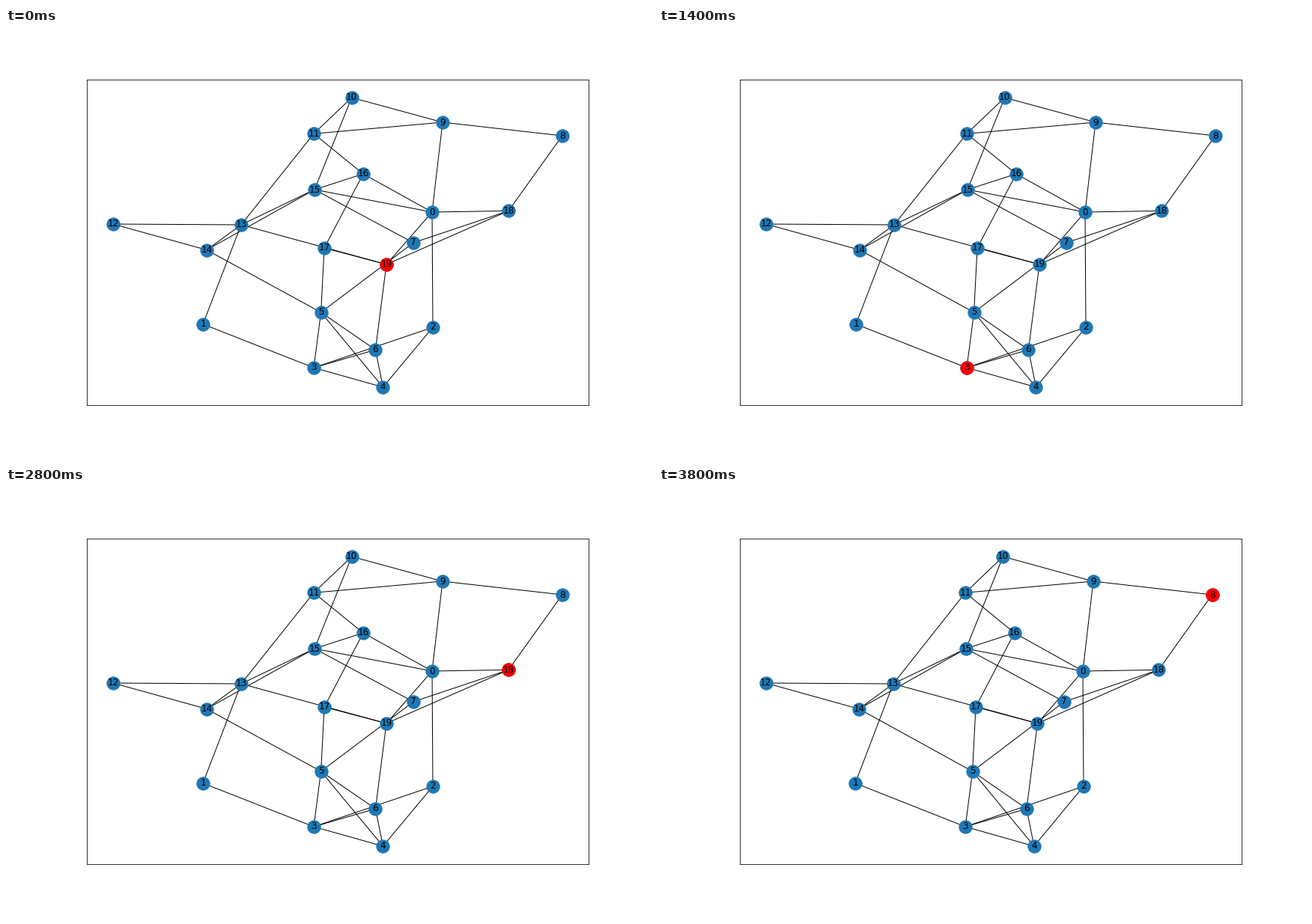
These frames come from a looping animation (864x576 px, 4000 ms). A matplotlib script:

```python
import numpy as np
import matplotlib.pyplot as plt
from matplotlib.animation import FuncAnimation
from matplotlib.collections import LineCollection

W, H, DPI = 864, 576, 72
N = 20
SIZE = 300                    # marker area in square points
RADIUS = np.sqrt(SIZE) / 2
MARGIN = 0.05

# Node positions in stage pixels, y pointing down
POS = np.array([
    (569, 246), (263, 395.8), (570, 400), (411, 454), (503.4, 480),
    (420.6, 380), (493.4, 430), (544, 287), (742.8, 144), (583, 126),
    (461.7, 93), (411, 141.3), (142.8, 262), (314, 263), (268, 296.6),
    (412, 216), (477, 195), (425, 294), (671, 244.4), (508, 315.9),
])

# Small-world graph: a ring with links of step 1 and 2, some of them rewired
REWIRED = {
    1: {0: 9, 1: 13, 6: 3, 7: 15, 11: 16, 17: 5},
    2: {6: 19, 7: 18, 8: 18, 10: 15, 14: 5, 15: 0, 16: 0, 19: 13},
}
EDGES = np.array([(i, REWIRED[step].get(i, (i + step) % N))
                  for step in (1, 2) for i in range(N)])

WALK = [19, 0, 2, 3, 5, 4, 5, 3] + [4, 2] * 2 + [0, 19] + [18, 8] * 3

# Axes rectangle, and the part of it left inside the margins
LO, HI = np.array([0.125 * W, 0.12 * H]), np.array([0.9 * W, 0.875 * H])
INSET = (HI - LO) * MARGIN / (1 + 2 * MARGIN)


def view(center):
    """Limits that hold the graph and the whole marker at center."""
    lo = np.minimum(LO + INSET, center - RADIUS)
    hi = np.maximum(HI - INSET, center + RADIUS)
    pad = (hi - lo) * MARGIN
    return lo - pad, hi + pad


fig = plt.figure(figsize=(W / DPI, H / DPI), dpi=DPI, facecolor="white")
ax = fig.add_axes([0.125, 0.125, 0.775, 0.755], xticks=[], yticks=[])
ax.add_collection(LineCollection(POS[EDGES], colors="black",
                                 linewidths=1, zorder=1))
ax.scatter(*POS.T, s=SIZE, c="#1f77b4", zorder=2)
walker = ax.scatter(*POS[WALK[0]], s=SIZE, c="red", zorder=2)
for i, (x, y) in enumerate(POS):
    ax.text(x, y, str(i), size=12, family="DejaVu Sans",
            ha="center", va="center", zorder=3)


def update(step):
    center = POS[WALK[step]]
    walker.set_offsets([center])
    (left, top), (right, bottom) = view(center)
    ax.set(xlim=(left, right), ylim=(bottom, top))
    return [walker]


anim = FuncAnimation(fig, update, frames=len(WALK), interval=200,
                     repeat=True, repeat_delay=0)
plt.show()
```
